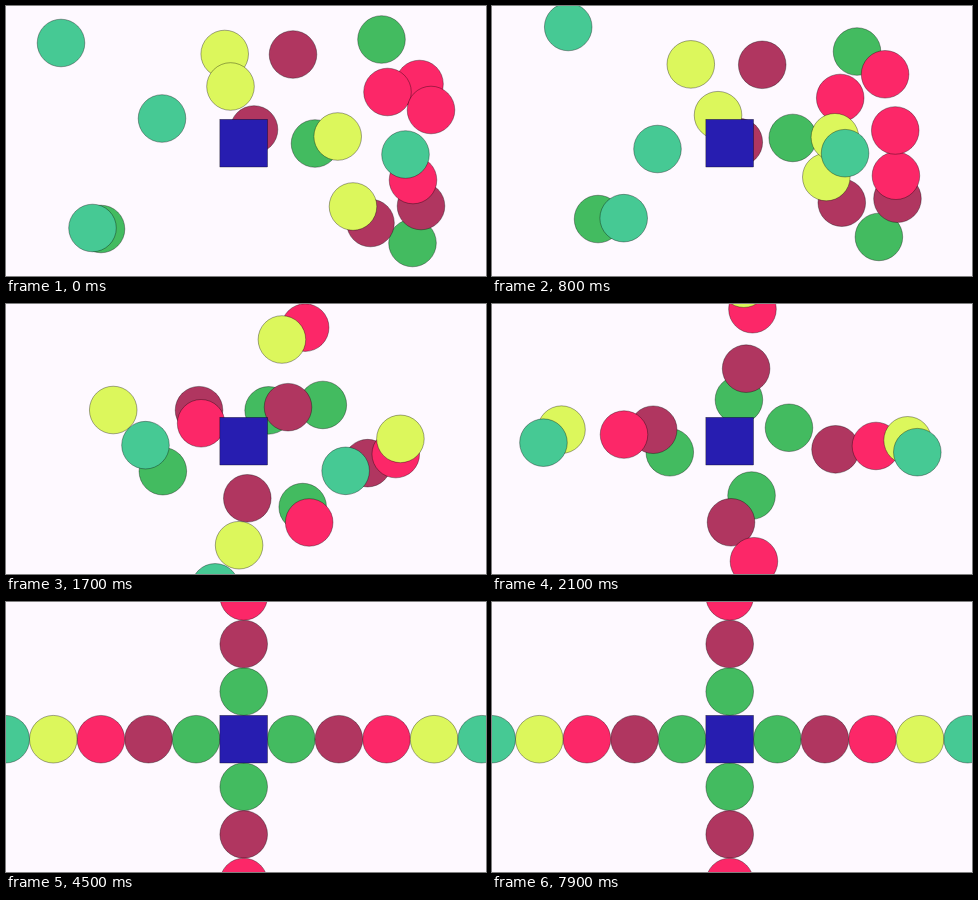
Recreate the animation shown at these times as an HTML page. Size 480 by 270 pixels, loop 8000 ms.

```html
<!DOCTYPE html>
<html lang="en">
<head>
<meta charset="utf-8">
<title>Circles forming a cross</title>
<style>
  html, body { margin: 0; width: 100%; height: 100%; overflow: hidden; background: #fef9ff; }
  svg { display: block; width: 480px; height: 270px; }
  circle, rect { stroke: #000; stroke-width: .35; }
</style>
</head>
<body>
<svg id="stage" viewBox="0 0 480 270"></svg>
<script>
const stage = document.getElementById('stage');
const LOOP = 8000, START = 310, END = 2622;
const CX = 237.7, CY = 137.2, STEP = 47.6, R = STEP / 2;

// Each ring: fill, then where its up, left, right and down circles start
const RINGS = [
  ['#43bb60', [309, 137.5], [95, 223], [375.5, 33.5], [406.5, 237]],
  ['#b03660', [364.5, 217], [287, 48.5], [415, 200], [248, 123.5]],
  ['#fc2768', [413.5, 78], [381.5, 86], [407, 174], [425, 104]],
  ['#dcf75c', [347, 200.5], [218.7, 48], [331.7, 130.5], [224.5, 80.5]],
  ['#46c994', [55, 37], [399.5, 148.5], [86.5, 222], [156, 112.5]]
];
const ANGLES = [-90, 180, 0, 90].map(deg => deg * Math.PI / 180);

function add(tag, attrs) {
  const el = document.createElementNS('http://www.w3.org/2000/svg', tag);
  for (const name in attrs) el.setAttribute(name, attrs[name]);
  return stage.appendChild(el);
}

const circles = RINGS.flatMap(([fill, ...starts], ring) =>
  starts.map(([x, y], i) => {
    const dist = STEP * (ring + 1);
    return {
      el: add('circle', { r: R, fill }),
      x, y,
      dx: CX + Math.cos(ANGLES[i]) * dist - x,
      dy: CY + Math.sin(ANGLES[i]) * dist - y
    };
  }));

add('rect', { x: CX - R, y: CY - R, width: STEP, height: STEP, fill: '#271db0' });

function smooth(t) {
  const u = Math.min(1, Math.max(0, (t - START) / (END - START)));
  return u * u * (3 - 2 * u);
}

function draw(t) {
  const k = smooth(t % LOOP);
  for (const { el, x, y, dx, dy } of circles) {
    el.setAttribute('cx', x + dx * k);
    el.setAttribute('cy', y + dy * k);
  }
}

function frame() {
  draw(performance.now());
  requestAnimationFrame(frame);
}
frame();
</script>
</body>
</html>
```
